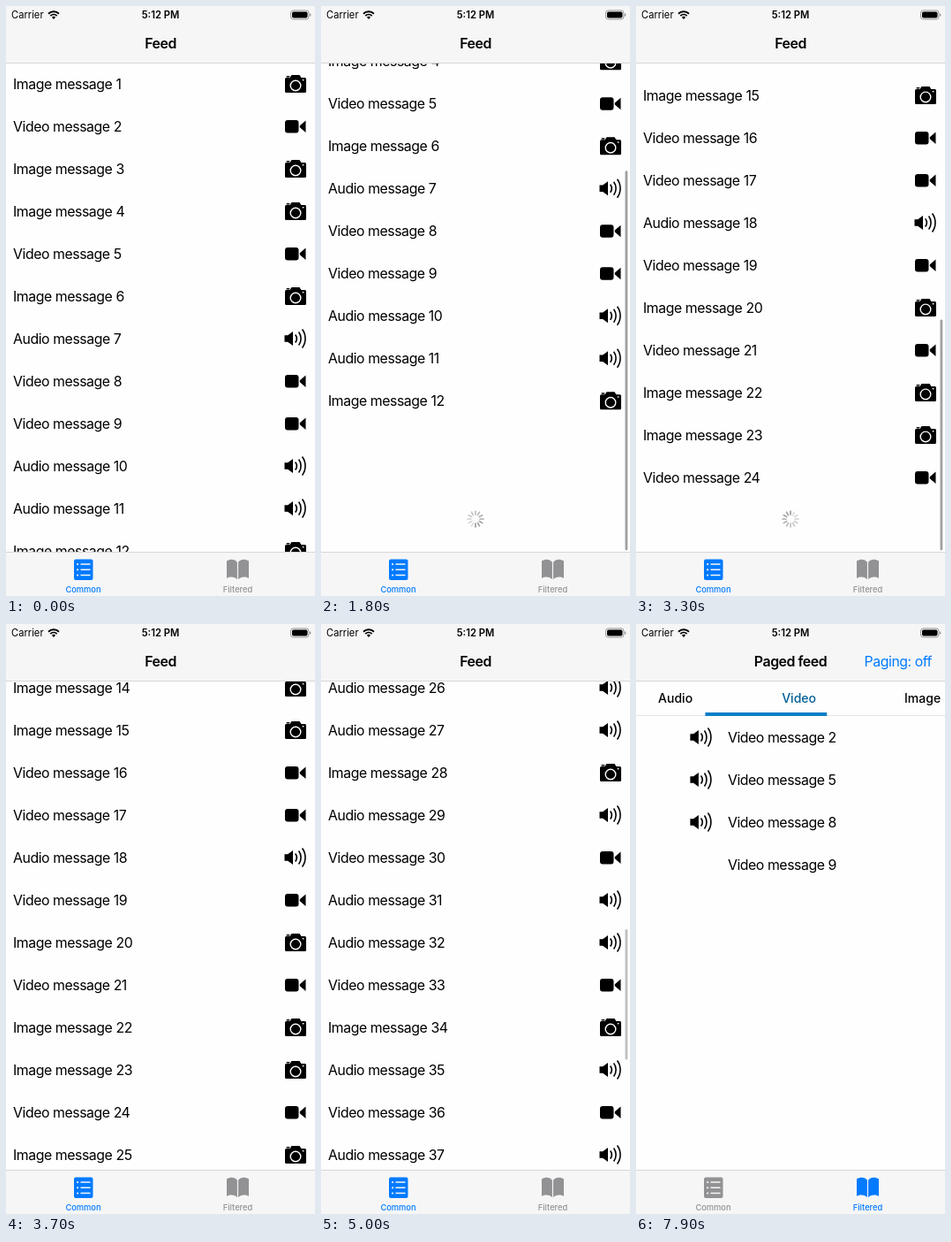
Recreate the animation shown at these times as an HTML page with a canvas. Size 350 by 667 pixels, loop 8 s.

```html
<!DOCTYPE html>
<html lang="en">
<head>
<meta charset="utf-8">
<title>Feed</title>
<style>
  html, body { margin: 0; width: 100%; height: 100%; overflow: hidden; background: #fefefe; }
  canvas { display: block; width: 350px; height: 667px; }
</style>
</head>
<body>
<canvas id="stage"></canvas>
<script>
const W = 350, H = 667, LOOP = 8000, STEP = 100;
const TOP = 65, BOTTOM = 617.5, VIEW = 553, ROW = 48, PAGE = 12, TRACK = 550;
const FOOTER = 41, RELEASE = 5, LOADED = 9, SETTLED = 10;
const FLICKS = [1200, 2500, 4000], SWITCH = 5500, SWIPE = 7500;
const PAPER = '#fefefe', BAR = '#f6f6f7', LINE = '#d6d6d9';
const INK = '#000', BLUE = '#007aff', GRAY = '#929294';
const TYPES = 'IVIIVIAVVAAI' + 'AIIVVAVIVIIV' + 'IAAIAVAAVIAV' + 'AIVVIAVIAAVI';
const NAMES = { I: 'Image', V: 'Video', A: 'Audio' };

const canvas = document.getElementById('stage');
const ctx = canvas.getContext('2d');
const ratio = window.devicePixelRatio || 1;
canvas.width = W * ratio;
canvas.height = H * ratio;

const clamp = (v, lo = 0, hi = 1) => Math.min(hi, Math.max(lo, v));
const smooth = u => { u = clamp(u); return u * u * (3 - 2 * u); };
const drag = k => 26.8 * Math.pow(k, 2.075);
const rubber = x => 0.747 * x / (1 + x / 300);
const limit = rows => rows * ROW - VIEW;

function rect(x, y, w, h, color, radius = 0) {
  ctx.fillStyle = color;
  ctx.beginPath();
  ctx.roundRect(x, y, w, h, radius);
  ctx.fill();
}

function poly(color, ...points) {
  ctx.fillStyle = color;
  ctx.beginPath();
  points.forEach(([x, y]) => ctx.lineTo(x, y));
  ctx.closePath();
  ctx.fill();
}

function arc(x, y, r, from, to, width, color) {
  ctx.strokeStyle = color;
  ctx.lineWidth = width;
  ctx.beginPath();
  ctx.arc(x, y, r, from, to);
  ctx.stroke();
}

function text(str, x, y, { size = 15.87, weight = 400, color = INK, align = 'left', spacing = 0 } = {}) {
  ctx.font = `${weight} ${size}px Inter, sans-serif`;
  ctx.letterSpacing = spacing + 'px';
  ctx.textAlign = align;
  ctx.fillStyle = color;
  ctx.fillText(str, x, y);
}

// Row icons, drawn around the centre of the icon
const icons = {
  I() {
    rect(-12, -7, 24, 17, INK, 1.5);
    poly(INK, [-7, -6], [-4.5, -10], [4.5, -10], [7, -6]);
    rect(-10.5, -9, 4, 1.5, INK, 0.7);
    arc(0, 2, 5.8, 0, Math.PI * 2, 1.4, PAPER);
    rect(7.6, -5, 2, 1.6, PAPER, 0.8);
  },
  V() {
    rect(-12, -7, 15.5, 14.5, INK, 3);
    poly(INK, [4.8, -0.8], [11.5, -6.5], [11.5, 7], [4.8, 1.3]);
  },
  A() {
    poly(INK, [-12.5, -3.7], [-8.8, -3.7], [-3, -8], [-3, 8], [-8.8, 3.7], [-12.5, 3.7]);
    for (let i = 0; i < 3; i++) arc(-6.5, 0, 7.7 + 4.9 * i, -0.64, 0.64, 1.6, INK);
  }
};

function row(n, y, x = 0) {
  const type = TYPES[n - 1];
  text(`${NAMES[type]} message ${n}`, x + 8, y + 5.8, { spacing: -0.45 });
  ctx.save();
  ctx.translate(x + 328, y);
  icons[type]();
  ctx.restore();
}

function spinner(y, t) {
  const head = Math.floor(t * 0.012 - 15.59);
  ctx.save();
  ctx.translate(175, y);
  ctx.lineCap = 'round';
  ctx.lineWidth = 1.6;
  for (let i = 0; i < 12; i++) {
    const age = (((head - i) % 12) + 12) % 12;
    ctx.strokeStyle = `rgba(70,70,75,${0.14 + 0.42 * (1 - age / 12)})`;
    ctx.beginPath();
    ctx.moveTo(0, -5);
    ctx.lineTo(0, -9);
    ctx.stroke();
    ctx.rotate(Math.PI / 6);
  }
  ctx.restore();
}

function scrollbar(offset, rows, over, alpha) {
  const size = Math.min(TRACK, TRACK * (VIEW + TOP) / (rows * ROW)) - Math.max(0, over - 26);
  const y = 65.5 + (TRACK - size) * clamp(offset / limit(rows));
  rect(344.5, y, 2.8, size, `rgba(0,0,0,${0.37 * alpha})`, 1.4);
}

// A flick drags the list past its end; it springs back to the footer while the next page loads
function flickOffset(from, rows, k) {
  const end = limit(rows);
  const raw = from + drag(Math.min(k, RELEASE));
  if (raw <= end) return raw;
  const over = rubber(raw - end);
  const back = smooth((k - RELEASE) / (SETTLED - RELEASE));
  return end + over + (FOOTER - over) * back;
}

function feed(t) {
  const index = FLICKS.filter(start => t > start).length - 1;
  const k = index < 0 ? 0 : (t - FLICKS[index]) / STEP;
  const before = PAGE * (Math.max(index, 0) + 1);
  const from = index > 0 ? limit(before - PAGE) + FOOTER : 0;
  const offset = flickOffset(from, before, k);
  const rows = k >= LOADED ? before + PAGE : before;
  const over = Math.max(0, offset - limit(rows));

  for (let n = 1; n <= rows; n++) {
    const y = 88 + (n - 1) * ROW - offset;
    if (y > 30 && y < 650) row(n, y);
  }
  if (over > 0) spinner(Math.max(580, BOTTOM - over + 21), t);
  if (k > 0) scrollbar(offset, rows, over, clamp((LOADED + 3 - k) / 3));
}

function pagedFeed(t) {
  const p = 0.726 * Math.pow(Math.max(0, t - SWIPE) / (4 * STEP), 1.5);
  const shift = W * p;
  ['A', 'V'].forEach((type, page) => {
    let y = 128;
    for (let n = 1; n <= PAGE; n++) {
      if (TYPES[n - 1] !== type) continue;
      row(n, y, page * W - shift);
      y += ROW;
    }
  });

  const strip = 35 * p;
  const selected = p < 0.5 ? 0 : 1;
  const strength = selected ? p : 1 - p;
  rect(0, 103, W, 1, '#e4e4e6');
  ['Audio', 'Video', 'Image'].forEach((label, i) => {
    const color = i === selected ? `rgb(0,${130 * strength},${205 * strength})` : INK;
    text(label, 70 + 140 * i - strip, 89.4, { size: 14, weight: 500, color, align: 'center' });
  });
  rect(8 + 132 * p - strip, 100, 132 + 8 * p, 4, '#0a7fc6');
}

function statusBar() {
  text('Carrier', 6, 14.2, { size: 11.2 });
  text('5:12 PM', 175, 14.2, { size: 11.2, weight: 600, align: 'center' });
  const up = -Math.PI / 2, spread = 0.76;
  ctx.fillStyle = INK;
  ctx.beginPath();
  ctx.moveTo(54, 15);
  ctx.arc(54, 15, 3, up - spread, up + spread);
  ctx.fill();
  [5.4, 8.7].forEach(r => arc(54, 15, r, up - spread, up + spread, 1.9, INK));

  ctx.strokeStyle = '#98989a';
  ctx.lineWidth = 1;
  ctx.beginPath();
  ctx.roundRect(322.5, 5, 20.5, 10, 3);
  ctx.stroke();
  rect(324, 6.5, 17.5, 7, INK, 1.8);
  rect(344, 8.5, 1.3, 3, '#98989a', 0.6);
}

function listIcon(color) {
  rect(77, 625.5, 21.5, 23.5, color, 2);
  [631, 637.2, 643.4].forEach(y => {
    rect(80, y - 1, 2.2, 2.2, BAR, 1.1);
    rect(84.5, y - 0.7, 11, 1.5, BAR);
  });
}

function bookIcon(color) {
  ctx.fillStyle = color;
  [-1, 1].forEach(side => {
    ctx.save();
    ctx.translate(262.5, 0);
    ctx.scale(side, 1);
    ctx.beginPath();
    ctx.moveTo(0.6, 628.8);
    ctx.bezierCurveTo(3, 625, 8.5, 625, 12.5, 627.3);
    ctx.lineTo(12.5, 647);
    ctx.bezierCurveTo(8.5, 644.8, 3.5, 645, 0.6, 648.3);
    ctx.fill();
    ctx.restore();
  });
}

function bars(filtered) {
  rect(0, 0, W, TOP, BAR);
  rect(0, TOP - 1, W, 1, LINE);
  rect(0, BOTTOM, W, H - BOTTOM, BAR);
  rect(0, BOTTOM - 0.5, W, 1, LINE);
  statusBar();

  text(filtered ? 'Paged feed' : 'Feed', 175, 48, { weight: 600, align: 'center', spacing: -0.45 });
  if (filtered) text('Paging: off', 335, 48, { color: BLUE, align: 'right', spacing: -0.45 });

  const left = filtered ? GRAY : BLUE, right = filtered ? BLUE : GRAY;
  const label = { size: 9.3, weight: 500, align: 'center' };
  listIcon(left);
  bookIcon(right);
  text('Common', 87.5, 663.2, { ...label, color: left });
  text('Filtered', 262.5, 663.2, { ...label, color: right });
}

function draw(now) {
  const t = Math.floor((now % LOOP) / STEP) * STEP;
  const filtered = t >= SWITCH;
  ctx.setTransform(ratio, 0, 0, ratio, 0, 0);
  rect(0, 0, W, H, PAPER);
  (filtered ? pagedFeed : feed)(t);
  bars(filtered);
}

let start;
function tick(now) {
  start ??= now;
  draw(now - start);
  requestAnimationFrame(tick);
}
draw(0);
requestAnimationFrame(tick);
</script>
</body>
</html>
```
